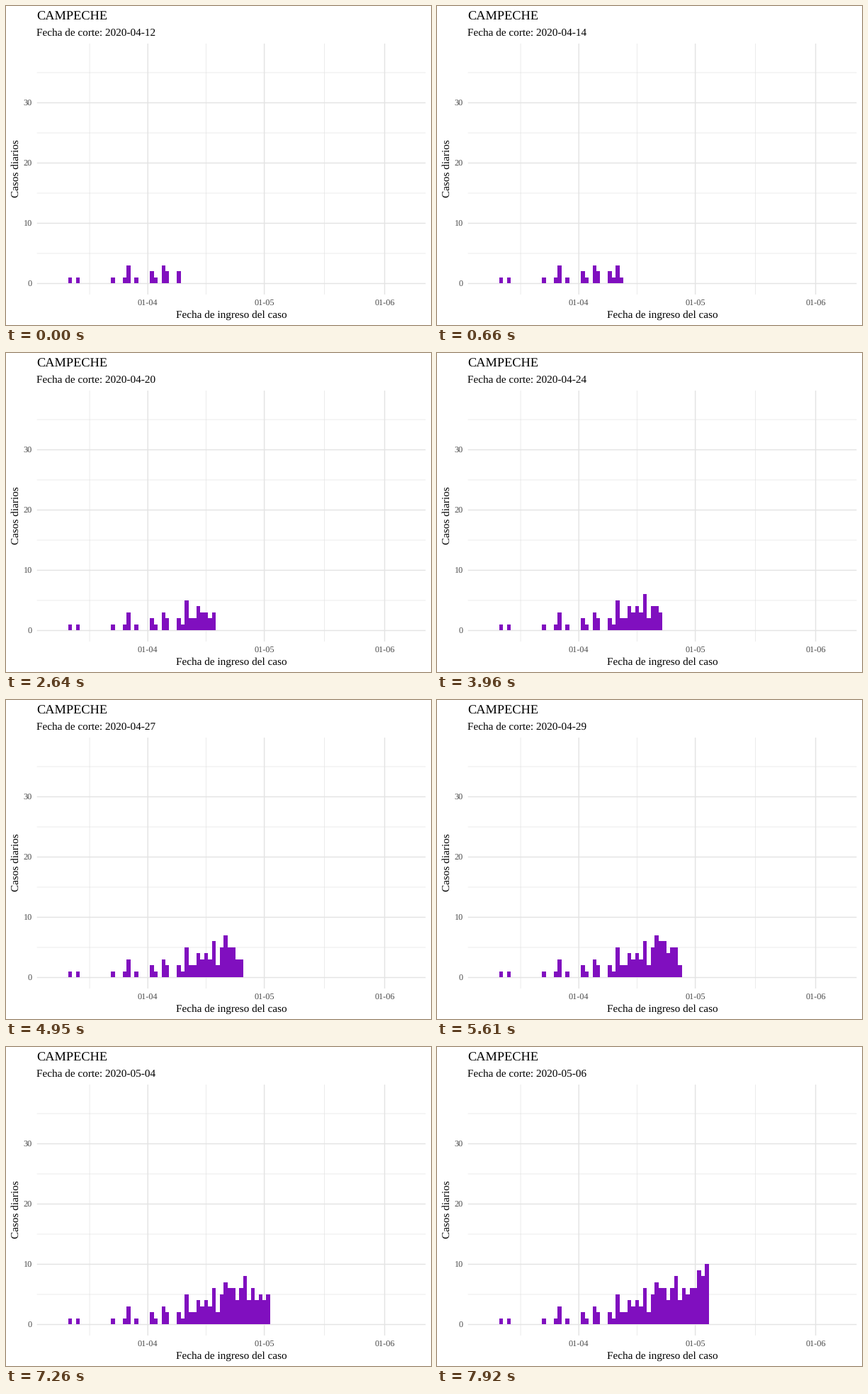
Recreate the animation shown at these times as a matplotlib script. Size 600 px wide and 450 px high, loop 8 s.

```python
import matplotlib.pyplot as plt
import numpy as np
from matplotlib.animation import FuncAnimation

W, H, DPI = 600, 450, 100
LOOP, STEP, TICK = 8000, 330, 20          # milliseconds
LEFT, RIGHT, TOP, BOTTOM = 43.7, 592.3, 53, 407
DAY_W, CASE_H, ZERO = 5.48, 8.5, 391.5
APRIL_1 = 199.85
PURPLE, GRID, GREY = "#800fbf", "#e4e4e4", "#4d4d4d"

# Days count from 31 March; early cases are settled before the first cut-off
FIRST_CUTOFF, REPORT_DAYS = 12, 5
EARLY = {-19: 1, -17: 1, -8: 1, -5: 1, -4: 3, -2: 1,
         2: 2, 3: 1, 5: 3, 6: 2, 9: 2}
DAILY = [1, 5, 2, 2, 4, 3, 4, 3, 6, 2, 5, 7, 6,
         6, 4, 6, 8, 4, 6, 5, 6, 7, 12, 13, 22]
TOTALS = {**EARLY, **dict(enumerate(DAILY, start=10))}
DAYS = np.arange(min(TOTALS), max(TOTALS) + 1)
CASES = np.array([TOTALS.get(d, 0) for d in DAYS])


def day_x(day):
    return APRIL_1 + DAY_W * (day - 1)


def case_y(cases):
    return ZERO - CASE_H * cases


def bar_tops(step):
    """Each day's cases come in quickly at first, then ever more slowly."""
    age = FIRST_CUTOFF + step - DAYS
    reported = np.sqrt(np.clip((age - 1) / REPORT_DAYS, 0, 1))
    known = np.where(DAYS < 10, CASES, np.round(CASES * reported))
    return np.floor(case_y(known))


def cutoff(step):
    day = FIRST_CUTOFF + step
    month, day = (4, day) if day <= 30 else (5, day - 30)
    return f"Fecha de corte: 2020-{month:02d}-{day:02d}"


plt.rcParams.update({"font.family": "Liberation Serif", "text.hinting": "none"})
fig = plt.figure(figsize=(W / DPI, H / DPI), dpi=DPI, facecolor="white")
ax = fig.add_axes([0, 0, 1, 1])
ax.axis("off")


def grid(xs, ys, width):
    style = dict(color=GRID, lw=width, snap=False, zorder=1)
    ax.vlines(xs, TOP, BOTTOM, **style)
    ax.hlines(ys, LEFT, RIGHT, **style)


def label(x, y, text, size, **kw):
    return ax.text(x, y, text, fontsize=size, va="baseline", **kw)


# Grid lines run through pixel centres, a little right of the day edges
months = {"01-04": day_x(1) + 0.4, "01-05": day_x(31) + 0.4,
          "01-06": day_x(62) + 0.4}
grid(day_x(np.array([-14, 16, 46.5])) + 0.4, case_y(np.arange(5, 40, 10)), 0.53)
grid(list(months.values()), case_y(np.arange(0, 40, 10)), 1.07)

for name, x in months.items():
    label(x, 423, name, 8.8, color=GREY, ha="center")
for cases in range(0, 40, 10):
    label(37.1, case_y(cases) + 4.4, str(cases), 8.8, color=GREY, ha="right")

label(LEFT - 0.4, 20, "CAMPECHE", 13.2)
subtitle = label(LEFT - 0.4, 42, cutoff(0), 11)
label((LEFT + RIGHT) / 2, 440, "Fecha de ingreso del caso", 11, ha="center")
label(18, (TOP + BOTTOM) / 2 - 1, "Casos diarios", 11, ha="center",
      rotation=90, rotation_mode="anchor")

# Bar edges sit on whole pixels
edges = np.ceil(day_x(np.append(DAYS, DAYS[-1] + 1) - 0.5))
bars = ax.stairs(bar_tops(0), edges, baseline=np.floor(ZERO), fill=True,
                 color=PURPLE, lw=0, snap=False, zorder=2)
ax.set(xlim=(0, W), ylim=(H, 0))


def update(frame):
    step = int((frame + 0.5) * TICK // STEP)
    bars.set_data(values=bar_tops(step))
    subtitle.set_text(cutoff(step))
    return bars, subtitle


anim = FuncAnimation(fig, update, frames=LOOP // TICK, interval=TICK,
                     init_func=lambda: update(0), repeat=True, repeat_delay=0)
plt.show()
```
